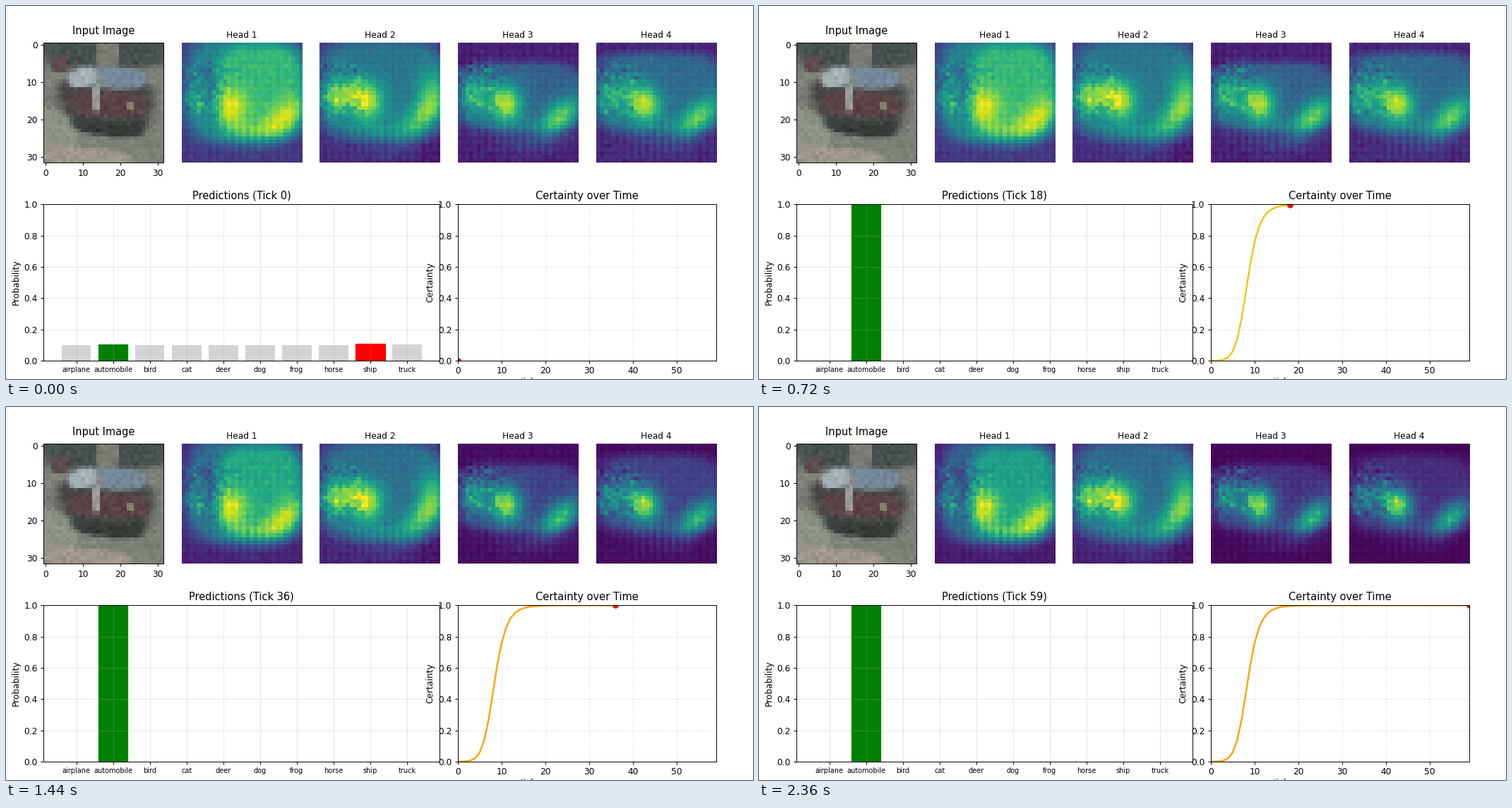
Write a matplotlib script that moves like this. It is 1058 px wide and 529 px high and loops after 2.4 s.

```python
import numpy as np
import matplotlib.pyplot as plt
from matplotlib.animation import FuncAnimation
from matplotlib.colors import to_rgb

WIDTH, HEIGHT, DPI = 1058, 529, 88
TICKS, N = 60, 32
CLASSES = ["airplane", "automobile", "bird", "cat", "deer",
           "dog", "frog", "horse", "ship", "truck"]
TRUE, SHIP, TRUCK = (CLASSES.index(c) for c in ("automobile", "ship", "truck"))

plt.rcParams["font.family"] = "DejaVu Sans"
rows, cols = np.mgrid[0:N, 0:N].astype(float)


def smoothstep(x, start, end):
    x = np.clip((x - start) / (end - start), 0, 1)
    return x * x * (3 - 2 * x)


# --- Predictions: a softmax sharpened until its entropy fits the certainty ---

ticks = np.arange(TICKS)
certainty = 1 / (1 + (14.33 / (ticks + 6)) ** 10.46)

odds = np.linspace(.054, .024, len(CLASSES))
odds[TRUE], odds[SHIP], odds[TRUCK] = .52, .083, .13
scores = np.log(odds / odds.max())


def softmax(logits):
    p = np.exp(logits)
    return p / p.sum()


def certainty_of(p):
    return 1 + (p * np.log(p)).sum() / np.log(len(p))


sharpness_grid = np.linspace(0, 10, 4000)
certainty_grid = [certainty_of(softmax(s * scores)) for s in sharpness_grid]
sharpness = np.interp(certainty, certainty_grid, sharpness_grid)


def probabilities(tick):
    logits = sharpness[tick] * scores
    logits[SHIP] += .06 * np.exp(-3 * tick)  # brief early wrong guess
    return softmax(logits)


# --- Shapes on the coarse grid ---

def radius(cx, cy, rx, ry, tilt=0, power=2):
    a = np.radians(tilt)
    dx, dy = cols - cx, rows - cy
    u = (dx * np.cos(a) + dy * np.sin(a)) / rx
    v = (dy * np.cos(a) - dx * np.sin(a)) / ry
    return (abs(u) ** power + abs(v) ** power) ** (1 / power)


def blob(*shape):
    return np.exp(-radius(*shape) ** 2 / 2)


def plateau(*shape):
    return 1 - smoothstep(radius(*shape, power=4), .8, 1.2)


def car_picture():
    rng = np.random.default_rng(4)
    img = np.full((N, N, 3), to_rgb("#7d8278"))

    def paint(color, *shape, power=3):
        mask = 1 - smoothstep(radius(*shape, power=power), .8, 1.2)[..., None]
        img[:] = img * (1 - mask) + np.array(to_rgb(color)) * mask

    # backdrop and street
    paint("#495050", 16, 0, 18, 7, 0)
    paint("#7a7b73", 16.5, 1, 3, 6, 0)
    paint("#5c4a4c", 4, 5.5, 2.5, 2, 0)
    paint("#8d9386", 2, 24, 7, 7, 0)
    paint("#9f978d", 11, 30, 12, 2.6, 6)
    # shadow, body, cabin
    paint("#363b3b", 17, 20.5, 10, 4, 5)
    paint("#4c494a", 16, 14.5, 12.8, 6, 4)
    paint("#5c4345", 17, 16, 10.5, 3, 2)
    paint("#7d8a90", 16.5, 9, 10, 3, 3)
    paint("#a5b0b3", 10, 9, 3.8, 2.3, -15)
    paint("#74889b", 21, 9, 5.5, 2.2, 3)
    paint("#999b98", 13.6, 14.5, .9, 3.5, 0)
    paint("#857b6e", 22.6, 16.5, 1.2, 1.2, 0)
    img += rng.normal(0, .02, (N, N, 1))
    return np.clip(img, 0, 1)


# --- Attention maps built from shared landmarks ---

left = blob(3.5, 14.5, 2.6, 3.5)
body = blob(12.5, 16.5, 3, 3.2)
middle = blob(9.5, 13, 4, 3.2)
rear = blob(26.5, 19.5, 4.8, 2.6, -42)
rear_top = blob(29.5, 13, 3, 4.5)
skirt = blob(17, 24.5, 7, 2.8)
interior = plateau(16, 12, 16.5, 13)
whole = plateau(16.3, 12, 15.5, 14)
side = plateau(20.5, 12.5, 11.5, 12)


def textured(field, seed):
    rng = np.random.default_rng(seed)
    ragged = plateau(5, 12, 7, 7)
    weave = (-1) ** cols * (.012 + .03 * skirt) + .012 * (-1) ** rows
    grain = rng.normal(0, 1, (N, N)) * (.018 + .05 * ragged)
    return np.clip(field + weave + grain, .01, 1)


heads = [
    .16 + .28 * whole + .23 * side + .3 * body + .25 * rear + .18 * left
    - .12 * blob(6.5, 12, 2, 3) + .12 * skirt,
    .13 + .26 * interior + .3 * left + .36 * middle + .34 * body
    + .32 * rear + .3 * rear_top + .12 * skirt - .08 * blob(30, 29, 4, 4),
    .09 + .22 * plateau(16, 14, 17, 9) + .3 * left + .2 * middle
    + .5 * body + .45 * rear + .1 * skirt,
    .11 + .23 * plateau(16, 13, 17, 10.5) + .25 * left + .18 * middle
    + .48 * body + .42 * rear + .1 * skirt,
]
heads = [textured(field, seed) for seed, field in enumerate(heads)]
FOCUS = [.45, .14, .65, .9]


# --- Figure ---

fig = plt.figure(figsize=((WIDTH + 1e-6) / DPI, (HEIGHT + 1e-6) / DPI), dpi=DPI)


def panel(left, top, width, height):
    return fig.add_axes([left / WIDTH, 1 - (top + height) / HEIGHT,
                         width / WIDTH, height / HEIGHT])


ax_input = panel(53.2, 52.2, 170, 170)
ax_input.imshow(car_picture())
ax_input.set_title("Input Image", pad=9.6)

maps = []
for i, field in enumerate(heads):
    ax = panel(53.2 + 195.6 * (i + 1), 52.2, 170, 170)
    maps.append(ax.imshow(field, cmap="viridis", vmin=0, vmax=1))
    ax.set_title(f"Head {i + 1}", fontsize=10)
    ax.axis("off")

ax_pred = panel(53.2, 281.3, 561.2, 221.6)
bars = ax_pred.bar(CLASSES, odds)
ax_pred.set_ylim(0, 1)
ax_pred.tick_params(axis="x", labelsize=8)
ax_pred.set_ylabel("Probability")
ax_pred.grid(True, alpha=.3)
pred_title = ax_pred.set_title("Predictions (Tick 0)")

ax_cert = panel(640, 281.3, 365.6, 221.6)
ax_cert.set_xlim(0, TICKS - 1)
ax_cert.set_ylim(0, 1)
ax_cert.set_ylabel("Certainty")
ax_cert.set_title("Certainty over Time")
ax_cert.grid(True, linestyle="--", alpha=.3)
curve, = ax_cert.plot([], [], lw=2)
dot, = ax_cert.plot([], [], "ro", ms=6)
fig.text(740 / WIDTH, 1 - 536.5 / HEIGHT, "tick", ha="center", va="baseline")

YELLOW, ORANGE = np.array(to_rgb("#e6dc24")), np.array(to_rgb("orange"))


def update(tick):
    p = probabilities(tick)
    guess = p.argmax()
    for i, bar in enumerate(bars):
        color = "green" if i == TRUE else "red" if i == guess else "lightgray"
        bar.set_height(p[i])
        bar.set_color(color)
        bar.set_linewidth(0 if color == "lightgray" else 1)
    pred_title.set_text(f"Predictions (Tick {tick})")

    sharpen = smoothstep(tick, 20, 48)
    for image, field, focus in zip(maps, heads, FOCUS):
        image.set_data(field ** (1 + focus * sharpen))

    warm = smoothstep(tick, 13, 25)
    curve.set_data(ticks[:tick + 1], certainty[:tick + 1])
    curve.set_color(tuple(YELLOW + (ORANGE - YELLOW) * warm))
    dot.set_data([tick], [certainty[tick]])
    return [*bars, pred_title, *maps, curve, dot]


anim = FuncAnimation(fig, update, frames=TICKS, interval=40,
                     init_func=lambda: update(0), repeat=True, blit=False)
plt.show()
```
